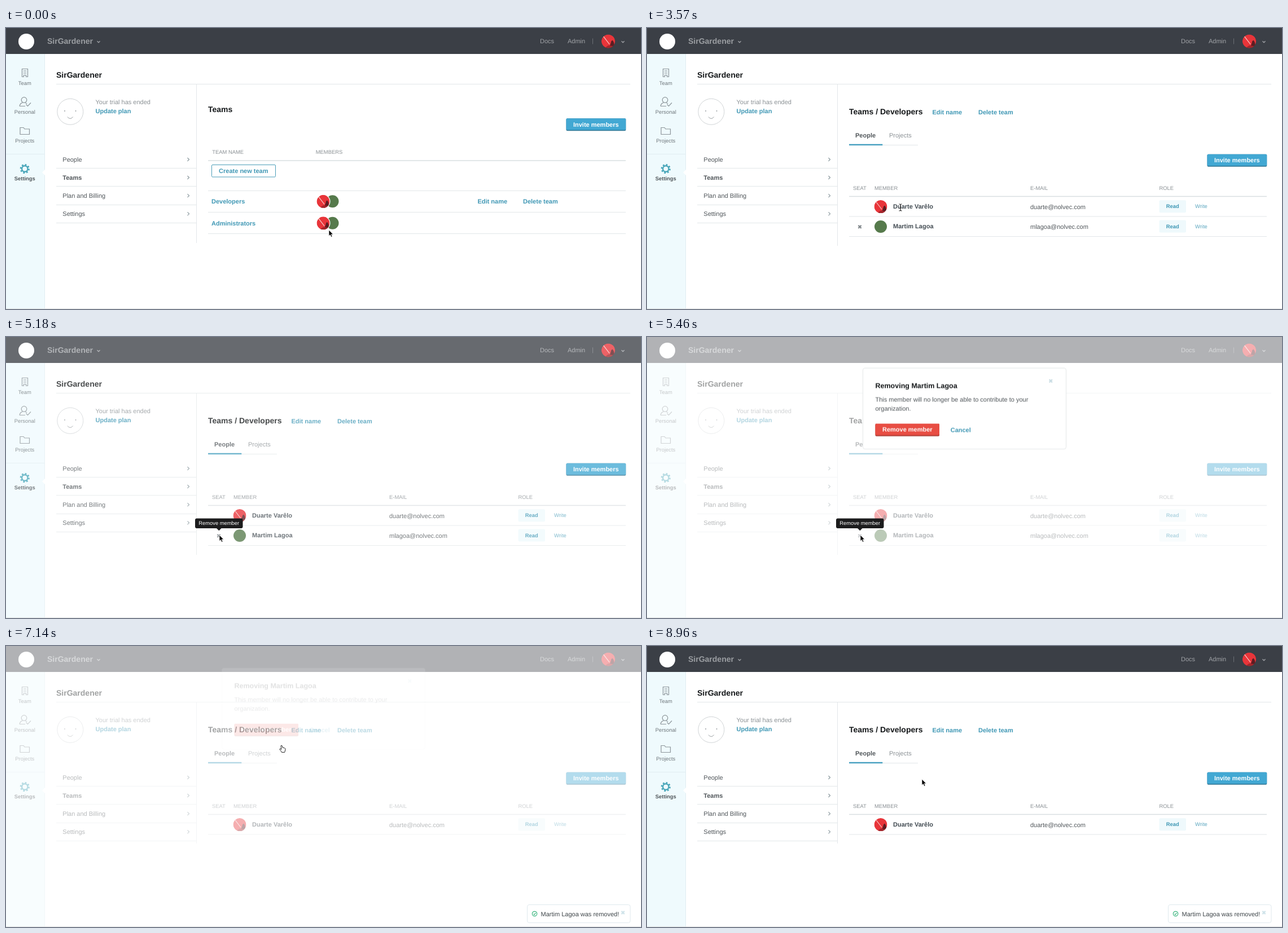
An HTML page for the animation above (9.1 s loop, 1125x498 px).

```html
<!DOCTYPE html>
<html lang="en">
<head>
<meta charset="utf-8">
<title>Team settings</title>
<style>
html, body { margin: 0; width: 100%; height: 100%; overflow: hidden; background: #fff; }
svg { display: block; width: 100vw; height: 100vh; }
text { font: 11px "Liberation Sans", Arial, sans-serif; fill: #50565a; text-rendering: geometricPrecision; white-space: pre; }
.b { font-weight: bold; }
.h { font-size: 14px; font-weight: bold; fill: #15181a; }
.s { font-size: 9.4px; }
.mid { text-anchor: middle; }
.grey { fill: #8b9195; }
.link { font-weight: bold; fill: #4098b5; }
.white { font-weight: bold; fill: #fff; }
.top { fill: #a0a3a7; }
.name { font-weight: bold; fill: #434c53; }
.line { stroke: #e2e7e9; fill: none; }
.head { stroke: #d9dfe1; stroke-width: 1.6; }
.icon { stroke: #8d959a; stroke-width: 1.2; fill: none; }
.chev { stroke: #87969c; stroke-width: 1.1; fill: none; }

/* One loop is 9.1s */
.teams, .team, .row, .tip, .hover, .arrow, .beam, .hand { animation: 9.1s step-end infinite; }
.teams { animation-name: teams; }
.team { animation-name: team; }
.row { animation-name: row; }
.hover { animation-name: hover; }
.tip { animation-name: tip; animation-timing-function: linear; }
.arrow { animation-name: arrow; }
.beam { animation-name: beam; }
.hand { animation-name: hand; }
.veil { animation: veil 9.1s linear infinite; }
.modal { animation: fade 9.1s linear infinite; }
.slide { animation: slide 9.1s ease-out infinite; }
.toast { animation: toast 9.1s linear infinite; }
.cursor { animation: move 9.1s ease-in-out infinite; }

@keyframes teams { 0% { opacity: 1 } 30.77%, 100% { opacity: 0 } }
@keyframes team { 0% { opacity: 0 } 30.77%, 100% { opacity: 1 } }
@keyframes row { 0% { opacity: 0 } 30.77% { opacity: 1 } 76.15%, 100% { opacity: 0 } }
@keyframes hover { 0% { fill: #4098b5 } 7.7% { fill: #23556a } 30.77%, 100% { fill: #4098b5 } }
@keyframes tip { 0%, 45% { opacity: 0 } 46.6%, 60.44% { opacity: 1 } 62%, 100% { opacity: 0 } }
@keyframes veil { 0%, 56.32% { opacity: 0 } 57.97%, 80.33% { opacity: .6 } 81.98%, 100% { opacity: 0 } }
@keyframes fade { 0%, 57.97% { opacity: 0 } 59.62%, 77.03% { opacity: 1 } 78.68%, 100% { opacity: 0 } }
@keyframes slide {
  0%, 57.97% { transform: translateY(-38px) }
  61.26%, 77.03% { transform: none }
  80.33%, 100% { transform: translateY(-38px) }
}
@keyframes toast { 0%, 76.15% { opacity: 0 } 77.8%, 100% { opacity: 1 } }
@keyframes arrow {
  0% { opacity: 1 } 30.77% { opacity: 0 } 40.5% { opacity: 1 }
  64.2% { opacity: 0 } 89.6%, 100% { opacity: 1 }
}
@keyframes beam { 0% { opacity: 0 } 30.77% { opacity: 1 } 40.5%, 100% { opacity: 0 } }
@keyframes hand { 0% { opacity: 0 } 64.2% { opacity: 1 } 89.6%, 100% { opacity: 0 } }
@keyframes move {
  0%, .77% { transform: translate(572px, 358px) }
  10.77%, 30.77% { transform: translate(460px, 307px) }
  36.92%, 39.23% { transform: translate(449px, 318px) }
  45.05%, 60.44% { transform: translate(378px, 351px) }
  64.62%, 67% { transform: translate(490px, 176px) }
  75%, 89.23% { transform: translate(488px, 176px) }
  94.62%, 100% { transform: translate(487px, 236px) }
}
</style>
</head>
<body>
<svg viewBox="0 0 1125 498" preserveAspectRatio="none">
<defs>
  <clipPath id="round"><circle r="11.5"/></clipPath>
  <g id="red" clip-path="url(#round)">
    <circle r="11.5" fill="#e8353a"/>
    <path d="M-8-8L2 5" stroke="#f6d5d2" stroke-width="1.1"/>
    <path d="M1 12L4 4 5 0 7-2 9 1 10 5 12 12Z" fill="#5d1c22"/>
    <path d="M-7 12L0 7 8 8 9 12Z" fill="#a5262b"/>
  </g>
  <circle id="green" r="11" fill="#567a4c"/>
  <path id="chev" class="chev" d="M-1.5-3L1.5 0-1.5 3"/>
  <path id="down" d="M-2.5-1.2L0 1.3 2.5-1.2" fill="none" stroke="#a0a3a7" stroke-width="1.3"/>
  <path id="cross" d="M-2.6-2.6L2.6 2.6M2.6-2.6L-2.6 2.6" stroke-width="2.2"/>
  <g id="invite">
    <rect x="992.5" width="105.7" height="22" rx="2" fill="#2d7391"/>
    <rect x="992.5" width="105.7" height="20.5" rx="2" fill="#42a8d3"/>
    <text class="white mid" x="1045.3" y="14.5">Invite members</text>
  </g>
  <g id="role">
    <rect x="907.5" y="-11" width="47.5" height="22" rx="2" fill="#eff9fc"/>
    <text class="link s mid" x="931.3" y="3">Read</text>
    <text class="s" x="971" y="3" style="fill:#5ba6bf">Write</text>
  </g>
</defs>

<rect width="1125" height="498" fill="#fff"/>

<!-- Sidebar -->
<rect y="46" width="69" height="452" fill="#effafd"/>
<path d="M68.5 46V498M0 223.5H69" class="line" style="stroke:#e0edf1"/>
<path d="M69.5 250.5L64 256 69.5 261.5Z" fill="#fff"/>
<g class="icon">
  <path d="M28.5 86.5V72.5H38.5V86.5H35.5V83.5H31.5V86.5Z"/>
  <path d="M31 75.5H36M31 78H36M31 80.5H36" stroke-dasharray="1.4 .4"/>
  <circle cx="32" cy="127.5" r="4.8"/>
  <path d="M24 138.5Q25 133 29.5 132.3M34 132.5Q36 133 37 134.5M24 138.5H34M35.5 135.5L38.5 138.5 44 132.5"/>
  <path d="M25 188.5V176.5H31L33 179H41.5V188.5Z"/>
</g>
<g fill="none" stroke="#4ba7ba">
  <circle cx="33.3" cy="249.5" r="5.2" stroke-width="2.4"/>
  <circle cx="33.3" cy="249.5" r="7.3" stroke-width="2.6" stroke-dasharray="2.87 2.863"/>
</g>
<g style="text-anchor:middle">
  <text class="s" x="33.3" y="100.5" style="fill:#6f777c">Team</text>
  <text class="s" x="33.3" y="151.5" style="fill:#6f777c">Personal</text>
  <text class="s" x="33.3" y="202.5" style="fill:#6f777c">Projects</text>
  <text class="s b" x="33.3" y="270">Settings</text>
</g>

<!-- Header -->
<rect width="1125" height="46" fill="#3b3f46"/>
<circle cx="36" cy="24" r="14" fill="#fff"/>
<text class="h" x="73" y="27.5" style="fill:#9b9ea2">SirGardener</text>
<use href="#down" x="164" y="24.5"/>
<text class="top" x="946" y="27">Docs</text>
<text class="top" x="995" y="27">Admin</text>
<path d="M1039.5 18.5V28.5" stroke="#6c7076"/>
<use href="#red" transform="translate(1067 23.5) scale(1.05)"/>
<use href="#down" x="1093" y="24.5"/>

<!-- Account column -->
<text class="h" x="89" y="88">SirGardener</text>
<path class="line" d="M89 99.5H1106M337.5 99V350M89 248.5H337M89 280.5H337M89 313.5H337M89 345.5H337"/>
<circle cx="113.8" cy="148.3" r="23" fill="none" stroke="#d0d4d6"/>
<circle cx="104" cy="147" r="1" fill="#9a9fa2"/>
<circle cx="123.5" cy="147" r="1" fill="#9a9fa2"/>
<path d="M108.8 157.5Q113.8 163.5 118.6 157.5" fill="none" stroke="#9a9fa2"/>
<text class="grey" x="158.5" y="135">Your trial has ended</text>
<text class="link" x="158.5" y="151">Update plan</text>
<text x="100.3" y="236.5">People</text>
<text class="b" x="100.3" y="268.8">Teams</text>
<text x="100.3" y="301">Plan and Billing</text>
<text x="100.3" y="333">Settings</text>
<use href="#chev" x="323" y="233"/>
<use href="#chev" x="323" y="265"/>
<use href="#chev" x="323" y="297.2"/>
<use href="#chev" x="323" y="329.3"/>

<!-- Team list -->
<g class="teams">
  <path class="line" d="M337.5 350V381M358 288.5H1098M358 326.5H1098M358 364.5H1098"/>
  <path class="head" d="M358 235H1098"/>
  <text class="h" x="358" y="149.3">Teams</text>
  <use href="#invite" y="160.3"/>
  <text class="s grey" x="365.3" y="223">TEAM NAME</text>
  <text class="s grey" x="548.8" y="223">MEMBERS</text>
  <rect x="364.5" y="242.5" width="113" height="21.5" rx="1.5" fill="#fff" stroke="#4a9db8"/>
  <text class="link mid" x="420.8" y="257">Create new team</text>
  <text class="link hover" x="364" y="311">Developers</text>
  <text class="link" x="364" y="349.7">Administrators</text>
  <text class="link" x="835.5" y="311">Edit name</text>
  <text class="link" x="916" y="311">Delete team</text>
  <use href="#green" x="578.5" y="307.3"/>
  <use href="#green" x="578.5" y="345.8"/>
  <circle cx="562" cy="307.3" r="12.5" fill="#fff"/>
  <circle cx="562" cy="345.8" r="12.5" fill="#fff"/>
  <use href="#red" x="562" y="307.3"/>
  <use href="#red" x="562" y="345.8"/>
</g>

<!-- Single team -->
<g class="team">
  <path class="line" d="M417 207.5H480M358 334H1098"/>
  <path class="head" d="M358 298.5H1098"/>
  <text class="h" x="358" y="152.5">Teams / Developers</text>
  <text class="link" x="505.5" y="152.5">Edit name</text>
  <text class="link" x="587" y="152.5">Delete team</text>
  <text class="b" x="369" y="194">People</text>
  <text class="grey" x="429" y="194">Projects</text>
  <rect x="358" y="205.7" width="59.3" height="2.4" fill="#459fbf"/>
  <use href="#invite" y="223.8"/>
  <g>
    <text class="s grey" x="365" y="287">SEAT</text>
    <text class="s grey" x="403" y="287">MEMBER</text>
    <text class="s grey" x="679" y="287">E-MAIL</text>
    <text class="s grey" x="907.5" y="287">ROLE</text>
  </g>
  <use href="#red" x="414" y="316.5"/>
  <text class="name" x="436" y="319.7">Duarte Varêlo</text>
  <text x="679" y="320.7">duarte@nolvec.com</text>
  <use href="#role" y="316.3"/>
</g>
<g class="row">
  <path class="line" d="M337.5 350V386M358 369.5H1098"/>
  <use href="#cross" x="377" y="352.3" stroke="#82888c"/>
  <use href="#green" x="414" y="352"/>
  <text class="name" x="436" y="355.3">Martim Lagoa</text>
  <text x="679" y="356">mlagoa@nolvec.com</text>
  <use href="#role" y="351.6"/>
</g>

<rect class="veil" width="1125" height="498" fill="#fff"/>

<g class="tip">
  <path d="M338 321.5H416.5Q419.5 321.5 419.5 324.5V336Q419.5 339 416.5 339H381.5L377.3 343.3 373 339H338Q335 339 335 336V324.5Q335 321.5 338 321.5Z" fill="#1c1c1d"/>
  <text class="s mid" x="377.2" y="333.3" style="fill:#fff">Remove member</text>
</g>

<g class="modal"><g class="slide">
  <rect x="382.5" y="62.5" width="360" height="143.5" rx="3.5" fill="#fff" stroke="#e4e7e8"/>
  <text class="b" x="404.5" y="97.5" style="font-size:12.5px;fill:#15181a">Removing Martim Lagoa</text>
  <use href="#cross" x="715.3" y="85.3" stroke="#c8dce3"/>
  <text x="404.5" y="122">This member will no longer be able to contribute to your</text>
  <text x="404.5" y="137.6">organization.</text>
  <rect x="404.5" y="161" width="113.5" height="22.3" rx="2" fill="#a5372f"/>
  <rect x="404.5" y="161" width="113.5" height="20.6" rx="2" fill="#e84d43"/>
  <text class="white mid" x="461.3" y="175.3">Remove member</text>
  <text class="link" x="537.7" y="176">Cancel</text>
</g></g>

<g class="toast">
  <rect x="923.5" y="458.5" width="182.5" height="32" rx="3.5" fill="#fff" stroke="#dfe9ee"/>
  <circle cx="936.5" cy="474.5" r="4.2" fill="none" stroke="#3ab67e" stroke-width="1.2"/>
  <path d="M934.5 474.6L936 476.1 938.7 473.1" fill="none" stroke="#3ab67e" stroke-width="1.2"/>
  <text x="947.5" y="478.5" style="fill:#3f464a">Martim Lagoa was removed!</text>
  <use href="#cross" x="1093" y="472.5" stroke="#cfe3ea"/>
</g>

<path d="M0 497.5H1125" stroke="#e3e5e6"/>

<g class="cursor">
  <path class="arrow" d="M0 0V10.6L2.4 8.4 4.2 12.4 6 11.6 4.3 7.8H7.6Z" fill="#000" stroke="#fff" stroke-width=".7"/>
  <path class="beam" d="M-2.5-6Q0-6 0-4.5Q0-6 2.5-6M0-4.5V4.5M-2.5 6Q0 6 0 4.5Q0 6 2.5 6M-1.5 1H1.5" fill="none" stroke="#222" stroke-width="1.1"/>
  <path class="hand" d="M-1 .8Q0-.8 1.2.8L2 4.2Q3.2 3.2 4 4.6Q5.2 4 5.6 5.2Q7 5 7 6.6L6.4 10.2 5.6 12.4H.4L-1.2 9.6-3.2 7.2Q-3.2 5.6-1.6 6.2L-.2 7.4Z" fill="#fff" stroke="#222" stroke-linejoin="round"/>
</g>
</svg>
</body>
</html>
```
